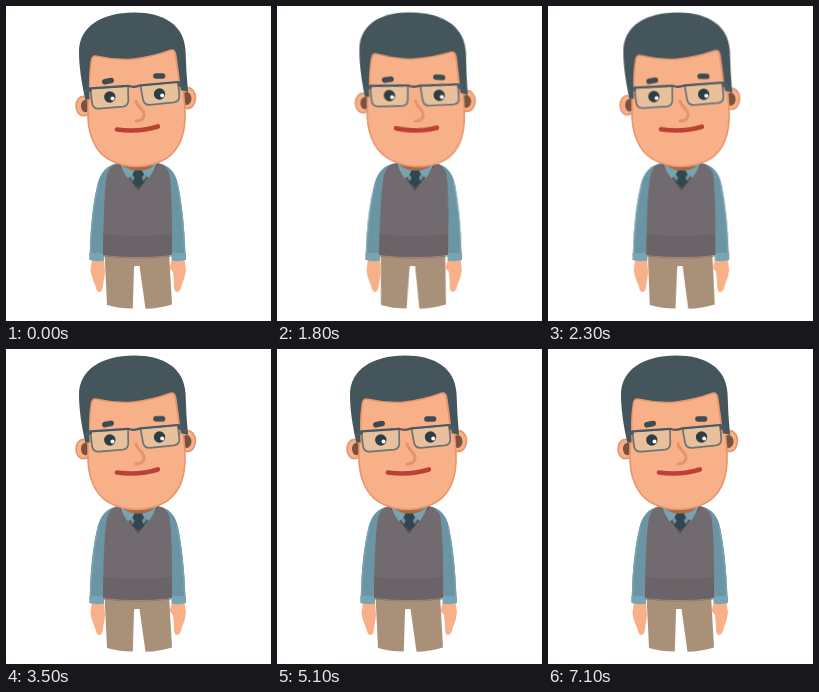
An HTML page that plays this animation: 265x315 px, repeating every 7200 ms.

```html
<!DOCTYPE html>
<html lang="en">
<head>
<meta charset="utf-8">
<title>Man with glasses</title>
<style>
  html, body { margin: 0; width: 100%; height: 100%; overflow: hidden; background: #fff; }
  svg { display: block; width: 100vw; height: 100vh; }

  .head, .body, .legs, .brows, .eye { animation: 7.2s infinite; }
  .head { animation-name: lean; transform-origin: 131px 161px; }
  .body { animation-name: sway; transform-origin: 0 250px; }
  .legs { animation-name: bend; transform-origin: 0 250px; }
  .brows { animation-name: raise; animation-timing-function: step-end; }
  .eye { animation-name: blink; animation-timing-function: step-end; transform-box: fill-box; transform-origin: center; }

  /* Out and back in five steps each way, 1.5 s to 2.4 s */
  @keyframes lean {
    0%, 34.715%, 100% { transform: translate(0, 0) skewY(0deg) skewX(0deg); }
    20.83% { transform: translate(0, 0) skewY(0deg) skewX(0deg); animation-timing-function: steps(5, start); }
    27.77% { transform: translate(9.2px, 0) skewY(4deg) skewX(-1.3deg); animation-timing-function: steps(5, start); }
  }
  @keyframes sway {
    0%, 34.715%, 100% { transform: translate(0, 0) skewX(0deg); }
    20.83% { transform: translate(0, 0) skewX(0deg); animation-timing-function: steps(5, start); }
    27.77% { transform: translate(6.3px, 0) skewX(-.8deg); animation-timing-function: steps(5, start); }
  }
  @keyframes bend {
    0%, 34.715%, 100% { transform: translate(0, 0) skewX(0deg); }
    20.83% { transform: translate(0, 0) skewX(0deg); animation-timing-function: steps(5, start); }
    27.77% { transform: translate(6.3px, 0) skewX(-3deg); animation-timing-function: steps(5, start); }
  }
  @keyframes raise {
    0%, 55.55%, 100% { transform: translateY(0); }
    48.605% { transform: translateY(-.2px); }
    49.995% { transform: translateY(-3px); }
    51.385% { transform: translateY(-5.5px); }
    52.775% { transform: translateY(-4px); }
    54.16% { transform: translateY(-1.5px); }
  }
  @keyframes blink {
    0%, 54.16%, 70.83%, 98.605%, 100% { transform: scaleY(1); }
    49.995%, 52.775%, 66.66%, 69.44%, 94.44%, 97.215% { transform: scaleY(.5); }
    51.385%, 68.05%, 95.83% { transform: scaleY(.12); }
  }

  .skin { fill: #f8b089; }
  .edge { stroke: #e6966d; stroke-width: 1.6; }
  .dark { fill: #44555c; }
  .shirt { fill: #6b95a2; }
  .line { fill: none; stroke-linecap: round; stroke-linejoin: round; }
  .frame { stroke: #4b5a61; }
</style>
</head>
<body>
<svg viewBox="0 0 265 315" preserveAspectRatio="none">
  <g class="legs" fill="#a99179">
    <path d="M98.500 246 H132 L128 262 L126.800 302.500 Q113 302.500 101 299 Z"/>
    <path d="M130 246 H163 L166 298.500 Q153 302.500 139.500 302.800 L133.500 260 Z"/>
    <path d="M126 246 H136 V260 H126 Z"/>
  </g>

  <g class="body">
    <path class="skin" d="M86 253 H98 L99 266 Q98.500 272 97.500 276 Q97 286 93.500 286 Q90.500 286 89.500 280 Q85 270 84.500 264 Z"/>
    <path class="skin" d="M166 253 H178.500 L180 264 Q179 272 176 278 Q174.500 286 171 286 Q167.500 286 168 277 L167 266 L163.500 262 Z"/>
    <path class="shirt" d="M112 157 Q96 160 91.500 178 Q84.500 207 83.700 250 H98 L109 185 Z"/>
    <path class="shirt" d="M152 157 Q168 160 172 178 Q178 207 179.500 250 H165.500 L157 185 Z"/>
    <path class="line" stroke="#7ba5b2" stroke-width="1.400" d="M92.300 178 Q85.300 207 84.500 247 M171.300 178 Q177.300 207 178.800 247"/>
    <path fill="#78a5b3" d="M83.300 247 H98 V254.500 Q90 256 83.300 254 Z M165.500 247 H180 V254 Q173 256 165.500 254.500 Z"/>

    <path class="line" stroke="#8f7b69" d="M98 250 Q131 254.500 165 250"/>
    <path fill="#716a6e" d="M113 157.500 Q104 158 101 169 Q97.500 188 97 249 Q131 253 166 249 Q166.500 190 163.500 168 Q160 158 152 157.500 Z"/>
    <path fill="#6a6367" d="M97.400 228 L97 249 Q131 253 166 249 L165.800 228 Q132 232 97.400 228 Z"/>
    <path fill="#5b5559" d="M112 157.500 L132 185 L153 157.500 Z"/>
    <path class="shirt" d="M114 157.500 L132 181.500 L151 157.500 Z"/>
    <path fill="#a66b4b" d="M117 156 H148 Q147 165 132 166 Q118 165 117 156 Z"/>
    <path fill="#79a3af" d="M114 157 Q120 163 130 165 L122 172.500 Q116 165 114 157 Z M151 157 Q146 163 135 165 L143 172 Q148 165 151 157 Z"/>
    <path fill="#304750" d="M128.500 164.500 H136 L138 168.500 L136 171.500 L138 176.500 L132.300 182 L126.500 176.500 L128.500 171.500 L126.500 168.500 Z"/>
  </g>

  <g class="head">
    <g class="skin edge">
      <ellipse cx="77.500" cy="100" rx="7.500" ry="9.800"/>
      <ellipse cx="181.500" cy="92" rx="8" ry="10.500"/>
    </g>
    <g fill="#7b5140">
      <ellipse cx="79.500" cy="100" rx="4.500" ry="6.200"/>
      <ellipse cx="180.500" cy="92.500" rx="5" ry="6.500"/>
    </g>
    <path class="skin edge" d="M82 46 L82 104 C81 128 89 145 102 153 Q115 160.500 131 160.500 Q148 160.300 161 152 C174 143 180 127 179 104 L174 42 Z"/>
    <path class="line" stroke="#e6966d" stroke-width="3" d="M83.500 93 Q82 72 84.500 55 Q85.500 48 91 49.500 Q108 53.500 126 52.500 Q147 50 164 43.500 Q169 42 170 49 Q173 66 174.500 84"/>
    <path class="dark" d="M79.500 94 C75.500 77 73 60 73 46 C73 21 95 6.500 128 6.500 C158 6.500 178 19 179.500 44 Q180 64 182 86 L175 84 Q173 66 170.500 49 Q169.500 42 164 43.500 Q147 50 126 52.500 Q108 53.500 91 49.500 Q85.500 48 84.500 55 Q82 72 83.500 93 Z"/>

    <path class="line" stroke="#e3946c" stroke-width="3" d="M130 95 C131 101 138 103 138 108.500 C138 113 134 115.300 130 115"/>
    <path class="line" stroke="#bd4034" stroke-width="4.700" d="M111 123.500 Q133 126.500 151.800 120.500"/>

    <g fill="#e8c09b">
      <path d="M84.500 82.500 L122 80 L122.300 94 Q122.300 100 117 100.700 L93 102.700 Q87 103 86 97 Z"/>
      <path d="M134.500 79.500 L172 76 L173.300 90 Q173.500 95.500 168 96.300 L144 98.800 Q138 99.200 137 93.500 Z"/>
    </g>
    <g class="brows line" stroke="#3d4c53" stroke-width="5.600">
      <path d="M98.800 75.800 L105.200 74.500"/>
      <path d="M150 70 L156.500 70"/>
    </g>
    <g class="eye">
      <circle cx="103.800" cy="91" r="5.700" fill="#2c3d45"/>
      <circle cx="106.500" cy="92.600" r="2" fill="#fff"/>
    </g>
    <g class="eye">
      <circle cx="153.500" cy="88" r="5.700" fill="#2c3d45"/>
      <circle cx="156.200" cy="89.600" r="2" fill="#fff"/>
    </g>
    <g class="line frame">
      <g stroke="#6d7474" stroke-width="1.700">
        <path d="M84.500 82.500 L122 80 L122.300 94 Q122.300 100 117 100.700 L93 102.700 Q87 103 86 97 Z"/>
        <path d="M134.500 79.500 L172 76 L173.300 90 Q173.500 95.500 168 96.300 L144 98.800 Q138 99.200 137 93.500 Z"/>
      </g>
      <path stroke-width="2.200" d="M80 84 L84.500 82.300 L122 79.800 Q128 82 134.500 79.300 L172 76 L177 77.500"/>
      <path stroke-width="3" d="M80 86 L84.500 84 M173 78.500 L180 83"/>
    </g>
  </g>
</svg>
</body>
</html>
```
